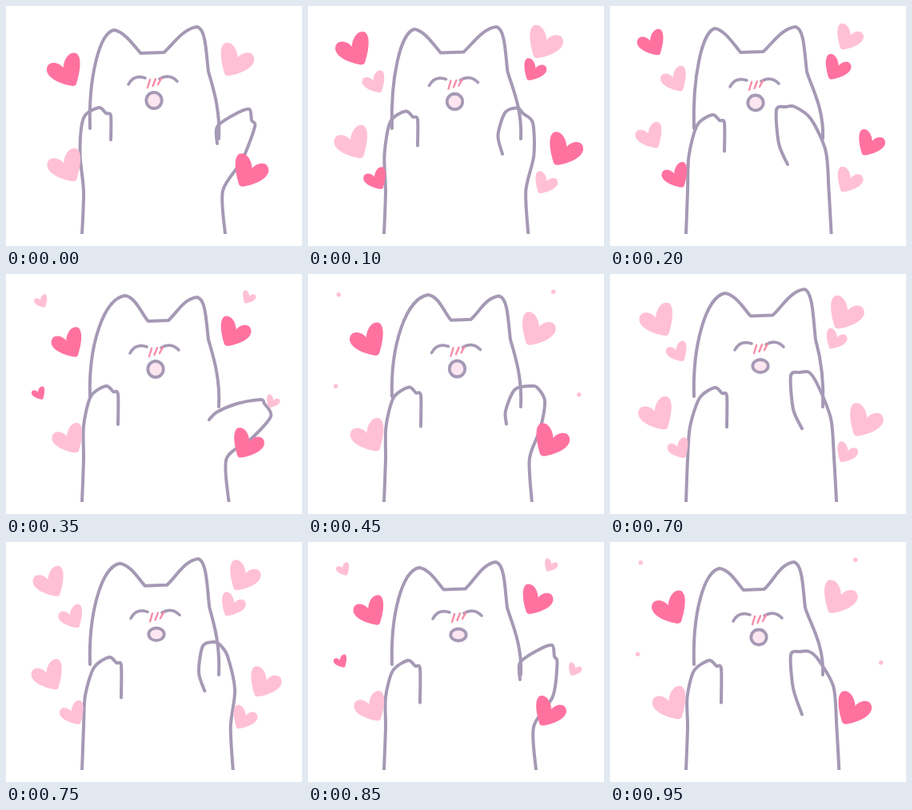
Recreate the animation shown at these times as an HTML page with a canvas. Size 370 by 300 pixels, loop 1 s.

```html
<!DOCTYPE html>
<html lang="en">
<head>
<meta charset="utf-8">
<title>Happy cat</title>
<style>
  html, body { margin: 0; width: 100%; height: 100%; overflow: hidden; background: #fff; }
  canvas { display: block; }
</style>
</head>
<body>
<canvas id="stage" width="370" height="300"></canvas>
<script>
const ctx = document.getElementById('stage').getContext('2d');
const LOOP = 1000, STEP = 50, FLOOR = 285;
const LINE = '#a599b5', BLUSH = '#f88ca8', MOUTH = '#fde6ef';
const DARK = '#ff72a0', LIGHT = '#ffc0d6';

// Arms run from the paw to the torso
const LEFT_ARM = [[140, 188], [140, 150], [134, 147], [125, 140], [106, 153],
  [97, 190], [97, 232], [95, FLOOR]];
const RIGHT_ARM = {
  cheek: [[240, 198], [229, 172], [226, 130], [238, 126], [249, 126], [260, 141], [267, 181]],
  wave: [[264, 172], [264, 151], [285, 136], [304, 129], [307, 143], [311, 151], [295, 193]],
  out: [[254, 182], [263, 173], [289, 162], [318, 157], [323, 162], [331, 178], [302, 206]]
};
const RIGHT_TORSO = [[271, 231], [274, FLOOR]];

// ears: both tips; mouth: centre and height; left, paw: offsets of each paw
const POSES = [
  { t: 0, ears: [135, 30, 239, 26], mouth: [185, 118, 10], left: [-9, -13], arm: 'wave', paw: [0, 0] },
  { t: 200, ears: [131, 28, 232, 26], mouth: [182, 121, 9.5], left: [3, -4], arm: 'cheek', paw: [-18, 0] },
  { t: 350, ears: [149, 27, 239, 29], mouth: [187, 119, 10], left: [0, 0], arm: 'out', paw: [0, 0] },
  { t: 550, ears: [152, 25, 239, 26], mouth: [186, 118, 10], left: [2, 3], arm: 'cheek', paw: [2, -3] },
  { t: 700, ears: [144, 24, 243, 19], mouth: [188, 115, 8], left: [6, 2], arm: 'cheek', paw: [0, -3] },
  { t: 850, ears: [139, 32, 235, 25], mouth: [188, 116, 7.5], left: [0, 8], arm: 'wave', paw: [1, 0] },
  { t: 950, ears: [137, 33, 230, 25], mouth: [186, 119, 9.5], left: [-1, 8], arm: 'cheek', paw: [0, 11] }
];
POSES.push({ ...POSES[0], t: LOOP });

// Hearts rise from -> to; dark is the part of a life spent in the strong pink
const LANES = [
  { from: [84, 98], to: [36, 22], dark: [0.3, 0.75] },
  { from: [283, 82], to: [308, 19], dark: [0, 0.4] },
  { from: [86, 219], to: [32, 136], dark: [-0.2, 0.3] },
  { from: [296, 224], to: [341, 147], dark: [0.3, 0.75] }
];
// The hearts rest for a moment, then catch up
const CLOCK = [[0, 0], [550, 0.55], [700, 0.55], [850, 0.85], [LOOP, 1]]
  .map(([t, age]) => ({ t, age }));
const PALE = [600, 800];

const lerp = (a, b, k) => Array.isArray(a) ? a.map((v, i) => lerp(v, b[i], k)) : a + (b - a) * k;

function between(keys, t) {
  const i = keys.findIndex(key => key.t > t);
  const a = keys[i - 1], b = keys[i];
  return [a, b, (t - a.t) / (b.t - a.t)];
}

function stroke(width, color = LINE) {
  ctx.lineWidth = width;
  ctx.strokeStyle = color;
  ctx.stroke();
}

// Smooth line through points
function curve(p) {
  const at = i => p[Math.max(0, Math.min(p.length - 1, i))];
  ctx.beginPath();
  ctx.moveTo(...p[0]);
  for (let i = 0; i < p.length - 1; i++) {
    const [a, b, c, d] = [at(i - 1), at(i), at(i + 1), at(i + 2)];
    ctx.bezierCurveTo(
      b[0] + (c[0] - a[0]) / 7, b[1] + (c[1] - a[1]) / 7,
      c[0] - (d[0] - b[0]) / 7, c[1] - (d[1] - b[1]) / 7, ...c);
  }
}

// Moves the paw, less towards the elbow; the loose end swings most
function movePaw(arm, [dx, dy]) {
  return arm.map(([x, y], i) => {
    const w = i < 5 ? 1 : i === 5 ? 0.5 : 0;
    return [x + dx * w, y + dy * (i ? w : 1.6)];
  });
}

function drawHead([ex, ey, fx, fy]) {
  const width = fx - ex, notch = (ey + fy) / 2 + 31;
  const ax = ex + width * 0.32, bx = fx - width * 0.4;
  const sx = fx + 14, sy = 82;
  ctx.beginPath();
  ctx.moveTo(105, 153);
  ctx.bezierCurveTo(103, 90, ex - (ex - 105) * 0.62, ey + 4, ex, ey);
  ctx.bezierCurveTo(ex + 13, ey + 2, ax - 8, notch - 9, ax, notch);
  ctx.lineTo(bx, notch - 1);
  ctx.bezierCurveTo(bx + 12, notch - 12, fx - 17, fy + 2, fx, fy);
  ctx.bezierCurveTo(fx + 11, fy + 3, sx - 3, sy - 24, sx, sy);
  ctx.bezierCurveTo(sx + 5, sy + 18, 268, 128, 266, 166);
  stroke(4);
}

function drawFace([x, y, h]) {
  ctx.save();
  ctx.translate(x, y);
  ctx.beginPath();
  ctx.moveTo(-32, -20);
  ctx.quadraticCurveTo(-25, -33, -11, -28);
  ctx.moveTo(7, -27);
  ctx.quadraticCurveTo(19, -34, 29, -24);
  stroke(3.6);
  ctx.beginPath();
  ctx.ellipse(0, 0, 9.7, h, 0, 0, 7);
  ctx.fillStyle = MOUTH;
  ctx.fill();
  stroke(3.8);
  ctx.beginPath();
  for (let i = 0; i < 3; i++) {
    ctx.moveTo(i * 7 - 5, -26 - i * 0.7);
    ctx.lineTo(i * 6.5 - 8, -16 - i * 2);
  }
  stroke(2.4, BLUSH);
  ctx.restore();
}

function drawCat(t) {
  const [a, b, k] = between(POSES, t);
  const mix = get => lerp(get(a), get(b), k);
  const drift = 13 * t / LOOP;
  const right = mix(p => movePaw(RIGHT_ARM[p.arm], p.paw)).concat(RIGHT_TORSO)
    .map(([x, y], i) => [i < 6 ? x : x + drift, y]);
  drawHead(mix(p => p.ears));
  for (const arm of [mix(p => movePaw(LEFT_ARM, p.left)), right]) {
    curve(arm);
    stroke(4);
  }
  drawFace(mix(p => p.mouth));
}

// A lopsided heart: one low wide lobe, one tall lobe
function drawHeart(x, y, size, side, color) {
  ctx.save();
  ctx.translate(x, y);
  ctx.scale(size * side, size);
  ctx.beginPath();
  if (size < 4) {
    ctx.arc(0, 0, 1, 0, 7);
  } else {
    ctx.moveTo(0.55, 1);
    ctx.bezierCurveTo(0.1, 0.95, -0.9, 0.65, -1, 0.1);
    ctx.bezierCurveTo(-1.05, -0.5, -0.35, -0.5, -0.02, -0.08);
    ctx.bezierCurveTo(0, -0.6, 0.35, -1.1, 0.75, -0.95);
    ctx.bezierCurveTo(1.15, -0.7, 0.95, 0.3, 0.75, 0.9);
    ctx.quadraticCurveTo(0.7, 1, 0.55, 1);
  }
  ctx.fillStyle = color;
  ctx.fill();
  ctx.restore();
}

function drawHearts(t) {
  const [a, b, k] = between(CLOCK, t);
  const clock = lerp(a.age, b.age, k);
  const pale = t >= PALE[0] && t < PALE[1];
  for (const { from, to, dark } of LANES) {
    const inRange = age => age >= dark[0] && age < dark[1];
    const side = from[0] < 185 ? 1 : -1;
    for (const age of [clock % 1, (clock + 0.5) % 1]) {
      if (age === 0) continue;
      // Slow near the cat, then a hop outwards
      const [x, y] = lerp(from, to, age <= 0.5 ? age / 2 : age);
      const size = Math.min(21, 12 + 20 * age, 55 * (1 - age));
      const strong = !pale && size >= 4 && (inRange(age) || inRange(age - 1));
      drawHeart(x, y, size, side, strong ? DARK : LIGHT);
    }
  }
}

function draw(t) {
  ctx.fillStyle = '#fff';
  ctx.fillRect(0, 0, 370, 300);
  ctx.save();
  ctx.beginPath();
  ctx.rect(0, 0, 370, FLOOR);
  ctx.clip();
  ctx.lineCap = ctx.lineJoin = 'round';
  drawCat(t);
  drawHearts(t);
  ctx.restore();
}

const start = performance.now();
function tick() {
  const t = (performance.now() - start) % LOOP;
  draw(Math.floor(t / STEP) * STEP);
  requestAnimationFrame(tick);
}
tick();
</script>
</body>
</html>
```
